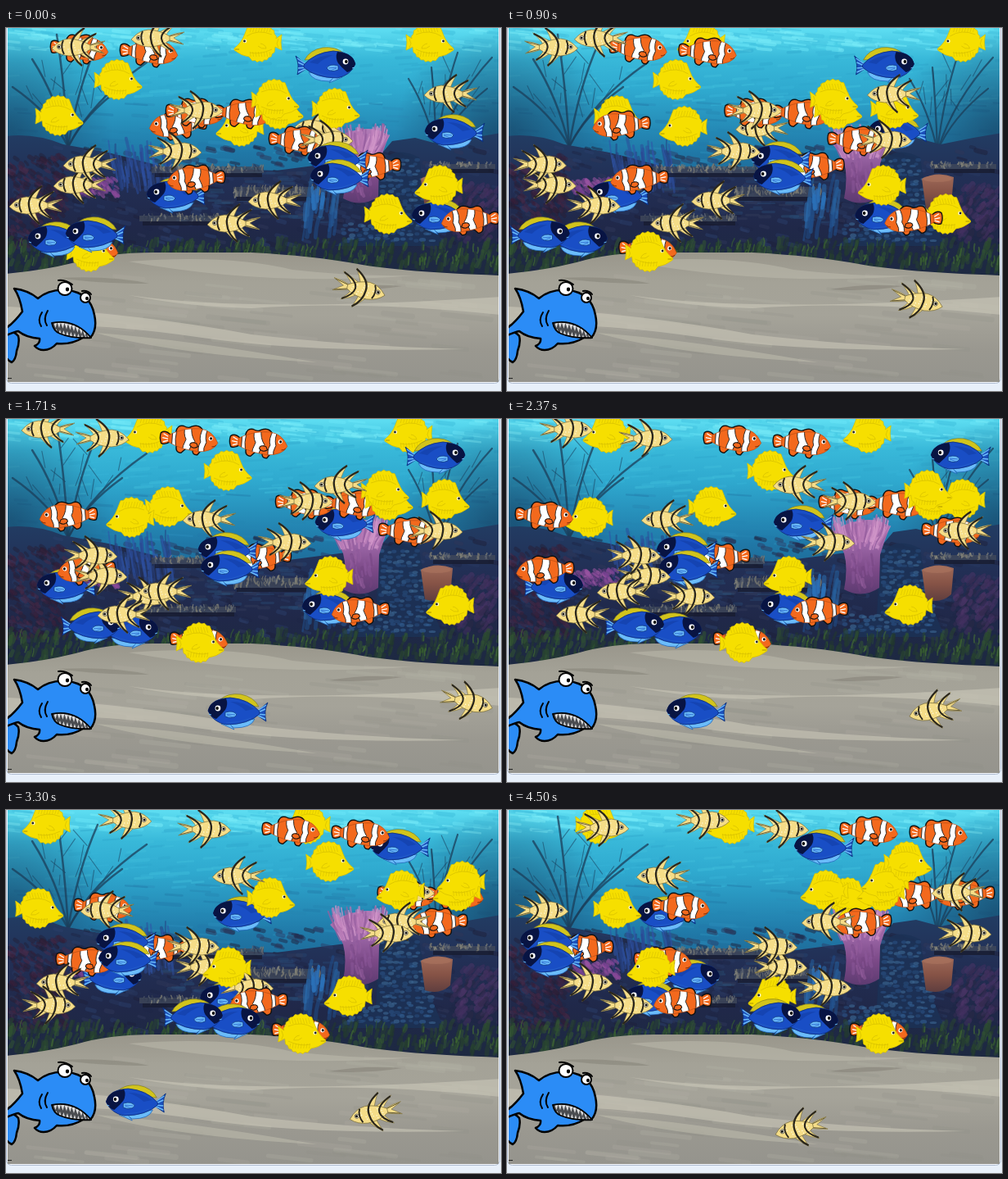
Write an HTML page with a canvas that moves like this. It is 605 px wide and 443 px high and loops after 4.6 s.

```html
<!DOCTYPE html>
<html lang="en">
<head>
<meta charset="utf-8">
<title>Reef</title>
<style>
html, body { margin: 0; width: 100%; height: 100%; overflow: hidden; background: #e8f0fa; }
canvas { display: block; }
</style>
</head>
<body>
<canvas id="stage" width="605" height="443"></canvas>
<script>
const W = 605, H = 443, LOOP = 4600, SPEED = 78.4;
const ctx = document.getElementById('stage').getContext('2d');

// Holding times of the successive pictures, in hundredths of a second
const gaps = ('12 15 12 12 15 12 12 15 15 12 12 12 15 12 12 15 12 15 12 12 ' +
  '15 15 12 15 12 15 12 15 12 12 12 12 15 15 10').split(' ');

function heldTime(ms) {
  let start = 0;
  for (const gap of gaps) {
    if (ms < start + gap * 10) return start / 1000;
    start += gap * 10;
  }
  return start / 1000;
}

let seed = 7;
function rnd(a = 0, b = 1) {
  seed = (seed * 16807) % 2147483647;
  return a + (b - a) * seed / 2147483647;
}
const pick = list => list[Math.floor(rnd(0, list.length))];

function shape(g, d, fill, stroke, width = 1) {
  const p = new Path2D(d);
  if (fill) { g.fillStyle = fill; g.fill(p); }
  if (stroke) { g.strokeStyle = stroke; g.lineWidth = width; g.stroke(p); }
}

function oval(g, x, y, rx, ry, fill, stroke, width = 1) {
  g.beginPath();
  g.ellipse(x, y, rx, ry, 0, 0, Math.PI * 2);
  if (fill) { g.fillStyle = fill; g.fill(); }
  if (stroke) { g.strokeStyle = stroke; g.lineWidth = width; g.stroke(); }
}

function gradient(g, y0, y1, ...colours) {
  const fill = g.createLinearGradient(0, y0, 0, y1);
  colours.forEach((c, i) => fill.addColorStop(i / (colours.length - 1), c));
  return fill;
}

// Run a drawing step clipped to a path
function inside(g, d, step) {
  g.save();
  g.clip(new Path2D(d));
  step();
  g.restore();
}

// Scatter of short brush strokes inside a box
function strokes(g, n, [x0, y0, x1, y1], colours, dx, dy, width, alpha = 0.6) {
  g.globalAlpha = alpha;
  for (let i = 0; i < n; i++) {
    const x = rnd(x0, x1), y = rnd(y0, y1), k = rnd(0.4, 1);
    g.strokeStyle = pick(colours);
    g.lineWidth = width * rnd(0.5, 1.2);
    g.beginPath();
    g.moveTo(x, y);
    g.quadraticCurveTo(x + dx * k * 0.5 + rnd(-2, 2), y + dy * k * 0.5, x + dx * k + rnd(-2, 2), y + dy * k);
    g.stroke();
  }
  g.globalAlpha = 1;
}

// A limb of a bare tree with thin side twigs
function limb(g, x, y, x2, y2, width) {
  shape(g, `M${x} ${y}Q${x + (x2 - x) * 0.3} ${y + (y2 - y) * 0.55} ${x2} ${y2}`, null, 'rgba(27,62,90,.75)', width);
  for (let k = 0.5; k < 0.95; k += 0.15) {
    const bx = x + (x2 - x) * k * k, by = y + (y2 - y) * k;
    shape(g, `M${bx} ${by}l${rnd(-18, 18)} ${rnd(-24, -12)}`, null, 'rgba(29,70,100,.6)', 1.1);
  }
}

function ledge(g, x, y, w, h) {
  g.fillStyle = 'rgba(66,74,90,.75)';
  g.fillRect(x, y, w, h);
  strokes(g, w * 0.6, [x, y - 3, x + w, y + h * 0.5], ['#77776f', '#5d6470', '#85847a', '#303a50'], 0, h * 0.7, 2, 0.8);
  g.fillStyle = 'rgba(24,28,48,.8)';
  g.fillRect(x + 4, y + h, w - 6, 5);
}

function paintWater(g) {
  g.fillStyle = gradient(g, 0, 190, '#5edef2', '#38b8d9', '#2fa9cf', '#2790bb', '#2078a7', '#1d6694');
  g.fillRect(0, 0, W, 200);
  strokes(g, 190, [0, 0, 600, 26], ['#6ae6f7', '#4bd0e8', '#7beefa', '#42c2df'], 30, 3, 4, 0.5);
  strokes(g, 170, [0, 24, 600, 95], ['#38b4d6', '#2fa6cd', '#40bedc'], 28, -2, 3.5, 0.45);
  strokes(g, 110, [0, 90, 600, 165], ['#2585b2', '#2279a8', '#2a8dba'], 32, 2, 4, 0.45);
  for (const x of [0, 605]) {
    const shade = g.createRadialGradient(x, 130, 10, x, 130, 130);
    shade.addColorStop(0, 'rgba(22,64,98,.7)');
    shade.addColorStop(1, 'rgba(22,64,98,0)');
    g.fillStyle = shade;
    g.fillRect(0, 0, W, 200);
  }
  for (const [x, y] of [[62, 8], [32, 38], [8, 72], [112, 18], [172, 42], [142, 72]])
    limb(g, 76, 145, x, y, 2.5);
  for (const [x, y] of [[492, 62], [520, 48], [552, 30], [594, 36], [588, 74]])
    limb(g, 526, 150, x, y, 2.2);
}

function paintReef(g) {
  shape(g, 'M0 132 Q35 128 70 142 L125 152 L195 170 L330 174 L392 166 L455 158 L472 138 L500 134 L530 142 L570 134 L605 128 V305 H0Z',
    gradient(g, 128, 300, '#223c63', '#222f55', '#202849', '#1d2941'));
  strokes(g, 400, [0, 145, 600, 268], ['#1d2645', '#27375f', '#2e3658', '#1e2039', '#293e69'], 12, 3, 5, 0.5);
  strokes(g, 80, [190, 176, 390, 240], ['#2a4f77', '#284870', '#343b5b'], 20, 0, 4, 0.45);
  strokes(g, 260, [0, 155, 72, 266], ['#35203a', '#3f2440', '#291d34', '#492a48', '#221f38'], 5, 4, 5, 0.5);
  strokes(g, 60, [128, 165, 205, 202], ['#2b4d99', '#2f53a8', '#263f80'], -5, -34, 3.5, 0.55);
  strokes(g, 100, [80, 183, 136, 202], ['#75408f', '#8a4b99', '#593777', '#9a55a2'], 5, 5, 4, 0.55);
  strokes(g, 110, [545, 195, 602, 262], ['#352c54', '#42305f', '#2a2844', '#4d3567'], 6, -7, 6, 0.5);
  ledge(g, 178, 169, 137, 8);
  ledge(g, 278, 194, 106, 12);
  ledge(g, 163, 229, 118, 7);
  ledge(g, 518, 166, 80, 6);
  strokes(g, 20, [362, 222, 404, 260], ['#245c98', '#2b69a8', '#1f4b85'], 6, -46, 5, 0.6);
  strokes(g, 7, [374, 205, 386, 228], ['#2a70b8', '#2d67aa'], 1, -28, 6, 0.8);

  // Stone tower and its rubble
  shape(g, 'M456 165 Q475 142 505 158 L514 215 L535 266 H402 Q425 250 452 240Z', 'rgba(28,50,86,.85)');
  const stones = ['#2a4f80', '#315c8d', '#264877', '#3a648f'];
  g.globalAlpha = 0.65;
  for (let y = 162; y < 264; y += 6) {
    const left = y > 235 ? 412 : 458, right = 502 + (y - 160) * 0.2;
    for (let x = left; x < right; x += 8)
      oval(g, x + rnd(0, 6), y + rnd(-2, 2), rnd(2.5, 4.5), rnd(1.5, 2.6), pick(stones));
  }
  g.globalAlpha = 1;

  // Pink coral
  shape(g, 'M396 140 Q412 126 432 124 Q455 120 468 132 Q460 152 456 166 L455 206 Q434 220 412 208 Q417 182 412 164 Q406 150 396 140Z',
    gradient(g, 120, 215, '#b47db8', '#9d68a8', '#7c4a88', '#5c3a70'));
  strokes(g, 24, [420, 160, 446, 198], ['#8b5799', '#74447f', '#98609f'], 2, 14, 4, 0.5);
  g.globalAlpha = 0.75;
  for (let i = 0; i < 80; i++) {
    const x = rnd(408, 456), lean = (x - 432) * 0.5;
    const top = x + lean + rnd(-3, 3);
    shape(g, `M${x} ${rnd(142, 160)}Q${x + lean * 0.8} 140 ${top} ${rnd(117, 134)}`, null,
      pick(['#c184bd', '#b073b0', '#d095c8', '#9860a0']), rnd(1.5, 3));
  }
  g.globalAlpha = 1;

  // Clay pot
  shape(g, 'M507 184 Q526 174 546 182 L543 214 Q530 226 512 220Z', gradient(g, 178, 224, '#a16c5a', '#865346', '#5c3c3e'));
  oval(g, 526, 184, 18, 4, 'rgba(172,118,96,.6)');
}

function paintSand(g) {
  strokes(g, 360, [0, 266, 602, 300], ['#2a4632', '#22392e', '#335632', '#263f30'], 3, -13, 5, 0.55);
  strokes(g, 120, [0, 266, 602, 292], ['#3c672f', '#466f34', '#2f5530'], 2, -11, 2, 0.6);
  shape(g, 'M0 300 Q45 296 85 286 Q125 274 180 274 T300 274 Q375 278 430 288 T605 302 V443 H0Z',
    gradient(g, 270, 432, '#98958a', '#a4a297', '#a5a399', '#9a9890', '#95948d'));
  strokes(g, 90, [0, 302, 560, 428], ['#b2afa2', '#8e8c83', '#b8b6aa'], 75, 8, 6, 0.22);
  const light = 'rgba(203,201,186,.6)';
  shape(g, 'M150 326 Q300 348 605 328 V350 Q430 332 300 342 Q220 340 150 326Z', light);
  shape(g, 'M0 340 Q160 348 300 374 Q420 388 560 392 Q360 396 240 378 Q120 360 0 361Z', light);
  shape(g, 'M150 285 Q270 276 350 295 Q430 304 500 302 Q320 316 150 285Z', 'rgba(192,189,176,.5)');
  shape(g, 'M110 372 Q220 380 380 408 Q200 398 110 372Z', 'rgba(195,193,178,.5)');
  shape(g, 'M395 319 Q440 311 484 315 Q440 322 395 319Z', 'rgba(112,106,99,.35)');
  shape(g, 'M65 305 Q130 302 175 312 Q110 312 65 305Z', 'rgba(115,111,100,.35)');
}

function paintShark(g) {
  const blue = '#2b8cf6';
  g.lineJoin = 'round';
  shape(g, 'M-4 371 Q9 368 15 376 Q17 384 13 394 Q12 405 7 408 Q2 406 -4 396Z', blue, '#000', 2.5);
  shape(g, 'M20 346 Q17 328 10 318 Q27 320 39 330 Q53 318 75 320 Q103 323 108 350 Q112 368 103 378 L94 378 Q79 387 62 385 Q55 393 46 393 Q39 393 35 388 Q42 385 41 379 Q25 378 15 370 Q9 371 -4 377 L-4 369 Q8 362 20 346Z', blue, '#000', 2.5);
  const mouth = 'M56 360 Q84 354 104 378 Q80 379 66 373 Q58 370 56 360Z';
  shape(g, mouth, '#4a4c50');
  inside(g, mouth, () => {
    for (let i = 0; i < 10; i++) {
      const x = 58 + i * 4.5, top = 359 + i * i * 0.16, low = 371 + i;
      shape(g, `M${x} ${top}l4.5 0 l-2 7Z M${x + 1} ${low + 3}l4.5 0 l-2 -7Z`, '#dcdcdc');
    }
  });
  shape(g, mouth, null, '#000', 1.8);
  shape(g, 'M44 347 Q38 356 43 364 M51 345 Q45 355 50 363', null, '#000', 2);
  oval(g, 72, 318, 8.5, 8, '#fff', '#000', 2);
  oval(g, 97, 329, 6, 6, '#fff', '#000', 2);
  oval(g, 75, 319, 2.2, 2.4, '#000');
  oval(g, 99, 330, 2, 2.2, '#000');
  shape(g, 'M64 308 Q72 307 81 313 M93 321 Q100 320 104 325', null, '#000', 2);
}

function paintScene() {
  const layer = document.createElement('canvas');
  layer.width = W;
  layer.height = H;
  const g = layer.getContext('2d');
  g.fillStyle = '#e8f0fa';
  g.fillRect(0, 0, W, H);
  g.beginPath();
  g.roundRect(0.5, -10, 603, 443.5, 6);
  g.fillStyle = '#f5f8fc';
  g.fill();
  g.strokeStyle = '#aebbd0';
  g.lineWidth = 1;
  g.stroke();
  g.save();
  g.beginPath();
  g.rect(2, 0, 600, 432);
  g.clip();
  g.lineCap = 'round';
  paintWater(g);
  paintReef(g);
  paintSand(g);
  paintShark(g);
  g.fillStyle = '#222';
  g.fillRect(2, 427, 5, 1);
  g.restore();
  return layer;
}

// Every fish is drawn around its centre, facing right
const draw = {
  Y(g) {
    const edge = '#d9c200';
    let body = 'M29 8 Q20 1 16 -10 ';
    for (let i = 0; i <= 12; i++) {
      const a = -0.95 - i * 0.16, r = i % 2 ? 23.2 : 24.8;
      body += `L${(Math.cos(a) * r * 0.9 - 1).toFixed(1)} ${(Math.sin(a) * r).toFixed(1)}`;
    }
    body += 'L-22 -4 L-29 -9 Q-27 1 -29 10 L-21 6 ';
    for (let i = 0; i <= 10; i++) {
      const a = 2.6 - i * 0.14, r = i % 2 ? 23 : 24.6;
      body += `L${(Math.cos(a) * r * 0.9 - 1).toFixed(1)} ${(Math.sin(a) * r).toFixed(1)}`;
    }
    shape(g, body + 'L11 18 Q20 17 29 10Z', '#f6df00', edge, 0.8);
    let rays = '';
    for (let i = 0; i < 8; i++) {
      const x = -14 + i * 3.4;
      rays += `M${x} -12L${x - 2} -19 M${x} 12L${x - 1} 18`;
    }
    shape(g, rays, null, '#dfc800', 0.8);
    shape(g, 'M-17 -9 Q0 -16 14 -7 M-17 9 Q-2 16 10 13 M-25 -4 L-23 2 L-25 7 M-3 2 Q-9 3 -10 8 Q-4 9 0 5', null, edge, 0.8);
    shape(g, 'M23 9 L28 9', null, '#957f00', 0.8);
    oval(g, 16, -1, 2.3, 2.2, '#fffbd0');
    oval(g, 16.5, -1, 1.4, 1.4, '#222');
  },
  C(g) {
    const orange = '#f3691d';
    g.rotate(0.07);
    shape(g, 'M-23 -4 Q-30 -10 -35 -6 Q-37 0 -34 7 Q-29 9 -23 4Z', orange, '#111', 1.4);
    shape(g, 'M-17 -8 Q-16 -17 -8 -16 Q-2 -13 2 -16 Q11 -20 16 -12 L10 -6Z', orange, '#111', 1.4);
    shape(g, 'M-15 7 Q-17 17 -9 17 L-3 11 M5 11 Q4 19 11 18 L16 11', orange, '#111', 1.4);
    const body = 'M-25 -4 Q-8 -14 12 -14 Q28 -13 35 2 Q30 13 12 14 Q-9 13 -25 5Z';
    shape(g, body, orange);
    inside(g, body, () => shape(g,
      'M17 -17 Q11 -5 14 2 Q10 9 13 17 L19 17 Q17 9 21 2 Q18 -7 23 -17Z M-6 -17 Q-8 -6 -4 0 Q-8 8 -8 17 L0 17 Q1 8 7 2 Q1 -6 2 -17Z M-21 -9 L-21 10 L-16 10 Q-18 1 -16 -10Z',
      '#fff', '#222', 0.9));
    shape(g, body, null, '#b14a12', 0.6);
    shape(g, 'M-32 -5 L-26 -2 M-33 0 L-26 1 M-32 5 L-26 3', null, '#fff', 1.3);
    shape(g, 'M9 4 Q1 2 1 7 Q5 12 11 8Z', orange, '#111', 1);
    oval(g, 26, -3, 2.6, 2.6, '#fff');
    oval(g, 26.4, -3, 1.5, 1.6, '#111');
    shape(g, 'M28 7 Q31 7 33 5', null, '#712b08', 0.9);
  },
  B(g) {
    const pale = '#6bbcfa';
    shape(g, 'M-24 0 L-37 -11 Q-32 0 -35 12 L-23 4Z', '#1c50bb', '#0a2c78', 0.8);
    shape(g, 'M-35 -8 L-23 0 M-34 -3 L-23 2 M-34 4 L-23 3 M-34 9 L-23 4', null, pale, 1.4);
    shape(g, 'M-26 -6 Q-20 -18 -4 -21 Q12 -23 22 -14 L4 -8Z', '#d2c41c', '#817d20', 0.7);
    shape(g, 'M-21 9 Q-17 20 4 20 L16 13Z', pale, '#1c5fb5', 0.7);
    shape(g, 'M10 14 L4 22 L20 15Z', pale, '#1c5fb5', 0.7);
    shape(g, 'M-27 0 Q-14 -15 9 -17 Q32 -16 36 -1 Q30 13 14 16 Q-13 16 -27 3Z', '#194ec5', '#0d2c78', 0.8);
    shape(g, 'M14 -16 Q34 -14 36 -1 Q33 7 26 9 Q19 3 15 -2 Q11 -9 14 -16Z', '#081443');
    shape(g, 'M-20 -3 Q-8 -12 9 -12 Q-3 -8 -10 -1Z', '#1544b2');
    shape(g, 'M15 1 Q4 -2 1 4 Q5 10 15 6Z', pale, '#0d3784', 0.8);
    shape(g, 'M3 4 L13 3 M5 7 L13 4 M-17 8 Q-2 14 14 14', null, '#245fc8', 0.8);
    oval(g, 24, -4, 3.4, 3.4, '#fff');
    oval(g, 24.8, -4, 1.8, 1.9, '#000');
    shape(g, 'M32 4 L35 3', null, pale, 1);
  },
  A(g) {
    const cream = '#f5dd88', line = '#7a6d3c', ink = '#2a261c';
    shape(g, 'M-13 -2 Q-22 -6 -33 -7 L-20 0 L-32 8 Q-20 6 -12 3Z', cream, line, 0.6);
    shape(g, 'M9 -9 Q1 -16 -8 -24 Q-3 -15 0 -7Z M-2 -7 Q-12 -12 -23 -17 Q-14 -9 -10 -3Z', cream, line, 0.6);
    shape(g, 'M10 10 Q3 18 -5 24 Q-2 16 1 8Z M-2 8 Q-10 14 -20 17 Q-13 10 -9 4Z', cream, line, 0.6);
    shape(g, 'M32 2 Q23 -9 11 -10 Q-4 -9 -15 -2 L-15 3 Q-4 11 11 11 Q24 10 32 2Z', cream, line, 0.7);
    for (let i = 0; i < 18; i++)
      oval(g, -11 + (i * 7) % 34, -6 + (i * 5) % 14, 0.7, 0.7, '#fffce2');
    shape(g, 'M18 -8 Q22 0 17 9', null, ink, 1.9);
    shape(g, 'M-8 -23 Q10 -12 8 1 Q7 14 -5 23', null, ink, 2.3);
    shape(g, 'M-22 -16 Q-4 -8 -5 1 Q-6 9 -19 16', null, ink, 2.1);
    shape(g, 'M-15 -2 L-31 -6 M-15 3 L-30 7', null, '#5d5434', 0.9);
    oval(g, 23, 0, 2.6, 2.6, '#fff8db', '#222', 0.6);
    oval(g, 23.3, 0, 1.5, 1.5, '#111');
  }
};

const walls = { Y: [34, 572], C: [35, 572], B: [39.5, 565.5], A: [36, 568.5] };

// Back to front: kind, start x, y, heading; optional sink rate, from, until
const fish = `Y 308 17 -1|Y 518 17 1|B 391 45 1|C 90 25 1|C 175 29 1|A 88 23 -1|A 185 12 -1
B 548 127 -1|Y 65 107 1|Y 286 120 -1|C 210 118 -1|A 382 122 -1|C 231 103 1|C 290 104 1
A 233 100 1|Y 334 99 1|Y 403 98 1|Y 329 87 1|Y 137 63 1|C 357 137 1|A 392 136 1
A 543 80 -1|C 447 169 -1|B 405 160 -1|B 208 204 -1|C 232 184 -1|B 408 182 -1|A 207 150 1
B 532 230 -1|Y 467 227 1|A 36 216 -1|A 90 191 -1|Y 529 192 -1|C 567 234 -1|C 102 270 1
Y 103 273 1|B 63 258 -1|B 109 252 -1|A 102 166 -1|A 328 210 -1|A 278 238 -1
A 432 318 1 15.5|B 417 357 -1 0 1.4 3.44|A 308 21 -1 0 4`
  .split(/[|\n]/).map(row => {
    const [kind, ...n] = row.split(' ');
    const [x, y, way, sink = 0, from = 0, until = 9] = n.map(Number);
    return { kind, x, y, way, sink, from, until };
  });

// Straight swim, turning round at the walls
function place(f, t) {
  const [lo, hi] = walls[f.kind], span = hi - lo;
  const vx = Math.sqrt(SPEED ** 2 - f.sink ** 2);
  let u = f.x - lo + f.way * vx * t, way = f.way;
  if (u < 0) { u = -u; way = 1; }
  if (u > span) { u = 2 * span - u; way = -1; }
  return { x: lo + u, y: f.y + f.sink * t, way, tilt: Math.atan2(f.sink, vx) };
}

const scene = paintScene();

function render(t) {
  ctx.drawImage(scene, 0, 0);
  ctx.save();
  ctx.beginPath();
  ctx.rect(2, 0, 600, 432);
  ctx.clip();
  ctx.lineJoin = 'round';
  for (const f of fish) {
    if (t < f.from || t >= f.until) continue;
    const p = place(f, t);
    ctx.save();
    ctx.translate(p.x, p.y);
    ctx.scale(p.way, 1);
    ctx.rotate(p.tilt);
    draw[f.kind](ctx);
    ctx.restore();
  }
  ctx.restore();
}

const begin = performance.now();
function tick() {
  render(heldTime((performance.now() - begin) % LOOP));
  requestAnimationFrame(tick);
}
tick();
</script>
</body>
</html>
```
